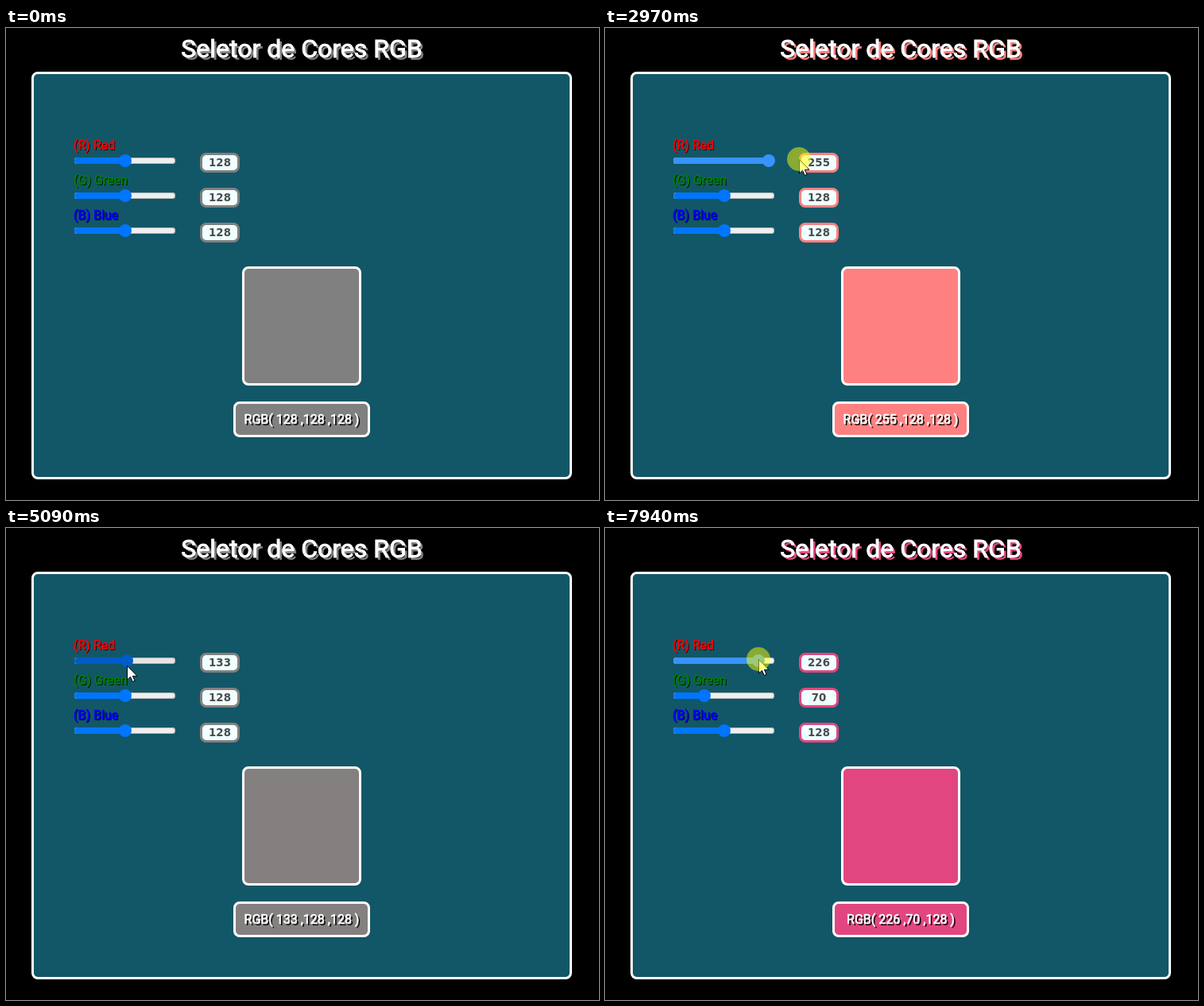
An HTML page that plays this animation: 746x594 px, repeating every 8000 ms.

```html
<!DOCTYPE html>
<html lang="pt">
<head>
<meta charset="utf-8">
<title>Seletor de Cores RGB</title>
<style>
  html, body { margin: 0; width: 100%; height: 100%; overflow: hidden; background: #000; }
  #stage { position: relative; width: 746px; height: 594px; overflow: hidden; font: 400 16px Roboto, sans-serif; --c: rgb(128,128,128); }
  #stage * { position: absolute; box-sizing: border-box; margin: 0; white-space: pre; }
  h1 { left: 0; top: 7px; width: 744px; text-align: center; font: 400 32px Roboto, sans-serif; color: #fff; -webkit-text-stroke: 1px #fff; text-shadow: 3px 3px var(--c); }
  .box { border: 3px solid #fff; border-radius: 8px; background: var(--c); }
  #panel { left: 32px; top: 55px; width: 680px; height: 513px; background: #125767; }
  #swatch { left: 297px; top: 300px; width: 150px; height: 150px; }
  #readout { left: 286px; top: 470px; width: 172px; height: 45px; line-height: 39px; text-align: center; color: #fff; -webkit-text-stroke: .6px #fff; text-shadow: 2px 2px #000; }
  #readout span { position: static !important; }
  .label { left: 85px; -webkit-text-stroke: .6px; text-shadow: 1px 1px #000; }
  .track { left: 86px; width: 127px; height: 8px; border-radius: 4px; background: #efefef; box-shadow: inset 0 0 0 1px #b2b2b2; }
  .fill { left: 0; top: 0; height: 8px; border-radius: 4px 0 0 4px; }
  .thumb { top: -4px; width: 16px; height: 16px; border-radius: 50%; }
  .num { left: 244px; width: 50px; height: 25px; border: 3px solid var(--c); border-radius: 8px; background: #f0ffff; color: #4c4c4c; font: 700 13.33px/20px "DejaVu Sans", sans-serif; text-align: center; }
  #pointer { left: 0; top: 0; }
  #halo { left: 0; top: 0; width: 30px; height: 30px; border-radius: 50%; background: rgba(255,255,0,.5); }
</style>
</head>
<body>
<div id="stage">
  <h1>Seletor de Cores RGB</h1>
  <div id="panel" class="box"></div>
  <div id="swatch" class="box"></div>
  <div id="readout" class="box"></div>
</div>
<script>
const LOOP = 8000;
const stage = document.getElementById('stage');
const readout = document.getElementById('readout');

function add(parent, cls, text = '') {
  const el = document.createElement('div');
  el.className = cls;
  el.textContent = text;
  parent.append(el);
  return el;
}

const channels = [['R', '(R) Red', 'red'], ['G', '(G) Green', 'green'], ['B', '(B) Blue', 'blue']]
  .map(([key, name, color], i) => {
    const y = 44 * i;
    const label = add(stage, 'label', name);
    label.style.cssText = `top:${138 + y}px;color:${color}`;
    const track = add(stage, 'track');
    track.style.top = 163 + y + 'px';
    const fill = add(track, 'fill'), thumb = add(track, 'thumb');
    const num = add(stage, 'num');
    num.style.top = 157 + y + 'px';
    return { key, track, fill, thumb, num };
  });

stage.insertAdjacentHTML('beforeend', `
  <svg id="pointer" width="14" height="22" viewBox="-.5 -.5 14 22">
    <path d="M0 0V17.5L4 13.8L6.8 20L9.6 18.8L6.9 12.8H12.4Z" fill="#fff" stroke="#000" stroke-width="1"/>
  </svg>
  <div id="halo"></div>`);
const pointer = document.getElementById('pointer');
const halo = document.getElementById('halo');

// Bursts of motion: start, end, number of steps
const bursts = [
  [240, 660, 7], [930, 1210, 5], [1280, 1620, 5], [1900, 2300, 7], [2570, 2640, 2],
  [2970, 3730, 12], [3800, 3800, 1], [4000, 4620, 10], [4760, 5450, 10], [5720, 6050, 6],
  [6250, 6720, 8], [6920, 6990, 2], [7250, 7330, 2], [7530, 7940, 6]
];

// Pointer path: time, x, y, red, green, action from here on
const path = [
  [0, 663, 557, 128, 128, 'none'],
  [240, 663, 557, 128, 128, 'move'],
  [660, 345, 188, 128, 128, 'move'],
  [930, 310, 186, 128, 128, 'move'],
  [1210, 133, 175, 128, 128, 'move'],
  [1400, 143, 169, 128, 128, 'hoverR'],
  [1620, 150, 167, 128, 128, 'hoverR'],
  [1900, 153, 167, 131, 128, 'dragR'],
  [2300, 218, 166, 255, 128, 'dragR'],
  [2570, 232, 166, 255, 128, 'dragR'],
  [2640, 244, 165, 255, 128, 'dragR'],
  [2970, 244, 165, 255, 128, 'dragR'],
  [3100, 210, 166, 255, 128, 'dragR'],
  [3730, 102, 168, 12, 128, 'dragR'],
  [3800, 99, 168, 5, 128, 'dragR'],
  [4000, 108, 170, 25, 128, 'dragR'],
  [4068.9, 123, 172, 59, 128, 'dragR'],
  [4620, 168, 170, 161, 128, 'dragR'],
  [4760, 165, 169, 155, 128, 'dragR'],
  [4990, 152, 168, 133, 128, 'dragR'],
  [5060, 152, 172, 133, 128, 'hoverR'],
  [5140, 152, 182, 133, 128, 'move'],
  [5370, 151, 210, 133, 128, 'hoverG'],
  [5450, 151, 213, 133, 128, 'hoverG'],
  [5720, 153, 213, 133, 131, 'dragG'],
  [6050, 200, 214, 133, 241, 'dragG'],
  [6250, 192, 214, 133, 222, 'dragG'],
  [6720, 118, 214, 133, 57, 'dragG'],
  [6920, 115, 214, 133, 48, 'dragG'],
  [6990, 119, 214, 133, 60, 'dragG'],
  [7250, 145, 192, 133, 70, 'hoverG'],
  [7330, 152, 168, 133, 70, 'hoverR'],
  [7530, 155, 167, 140, 70, 'dragR'],
  [7940, 193, 165, 226, 70, 'dragR']
];

const looks = { idle: ['#0075ff', '#efefef'], hover: ['#005cc8', '#e5e5e5'], drag: ['#3793ff', '#f5f5f5'] };

// Hold the pose between steps
function snap(t) {
  const burst = bursts.findLast(b => b[0] <= t);
  if (!burst) return 0;
  const [start, end, n] = burst;
  if (n === 1) return start;
  const step = (end - start) / (n - 1);
  return start + step * Math.min(n - 1, Math.floor((t - start) / step + .2));
}

function poseAt(t) {
  const i = path.findLastIndex(p => p[0] <= t + .1);
  const a = path[i], b = path[i + 1] || a;
  const u = b === a ? 0 : Math.max(0, (t - a[0]) / (b[0] - a[0]));
  const mix = k => a[k] + (b[k] - a[k]) * u;
  return { x: mix(1), y: mix(2), rgb: [Math.round(mix(3)), Math.round(mix(4)), 128], action: a[5] };
}

function draw(t) {
  const { x, y, rgb, action } = poseAt(snap(t));
  stage.style.setProperty('--c', `rgb(${rgb})`);
  readout.textContent = `RGB( ${rgb.join(' ,')} )`;
  channels.forEach((ch, i) => {
    const state = action.endsWith(ch.key) ? action.slice(0, -1) : 'idle';
    const [blue, grey] = looks[state];
    const pos = 8 + rgb[i] / 255 * 111.5;
    ch.track.style.backgroundColor = grey;
    ch.fill.style.background = ch.thumb.style.background = blue;
    ch.fill.style.width = pos + 'px';
    ch.thumb.style.left = pos - 8 + 'px';
    ch.num.textContent = rgb[i];
  });
  pointer.style.visibility = action === 'none' ? 'hidden' : 'visible';
  pointer.style.transform = `translate(${Math.round(x)}px,${Math.round(y)}px)`;
  halo.style.visibility = action.startsWith('drag') ? 'visible' : 'hidden';
  halo.style.transform = `translate(${Math.round(x) - 15}px,${Math.round(y) - 15}px)`;
}

const begin = performance.now();
function tick() {
  draw((performance.now() - begin) % LOOP);
  requestAnimationFrame(tick);
}
tick();
</script>
</body>
</html>
```
